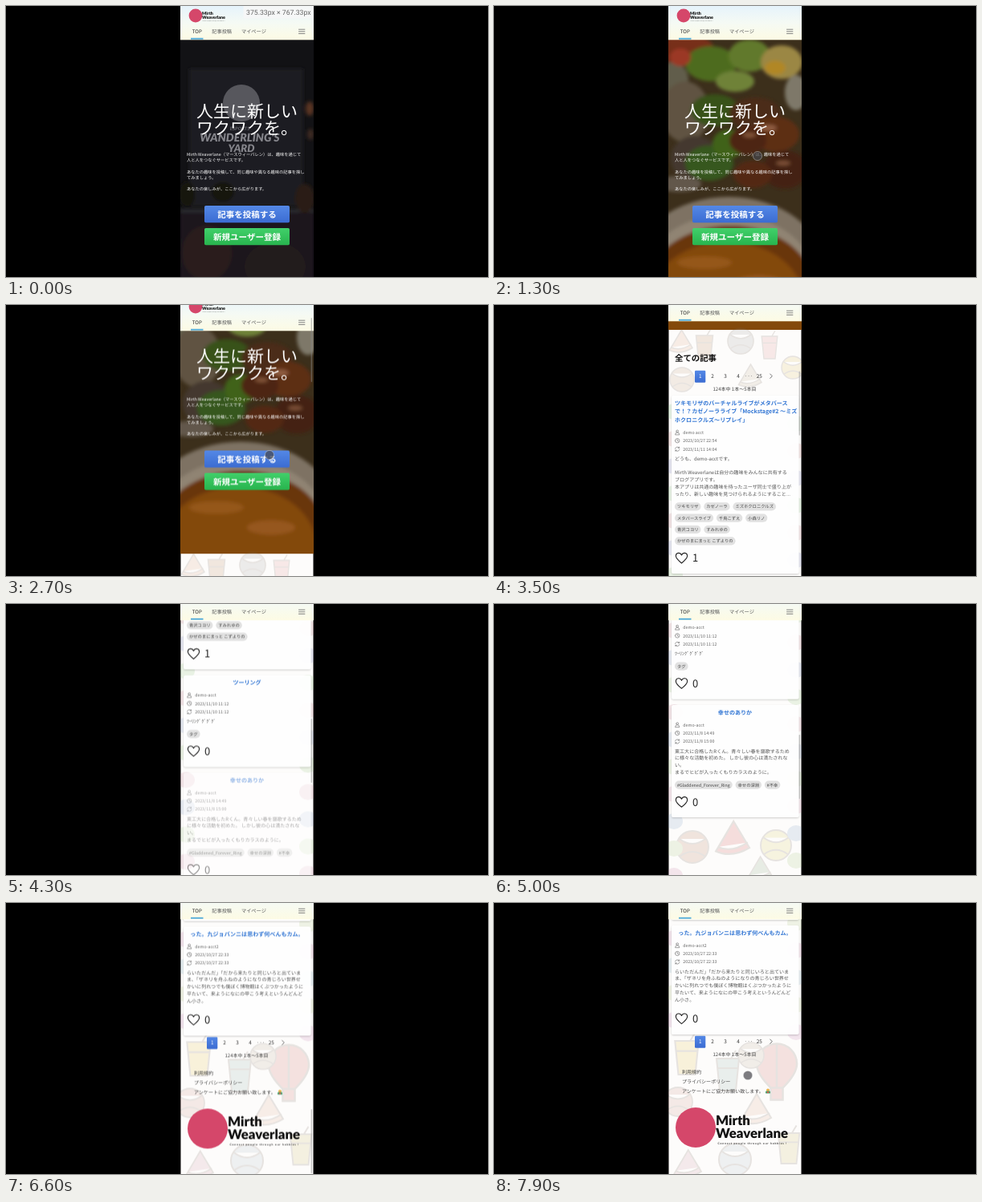
Recreate the animation shown at these times as an HTML page. Size 600 by 338 pixels, loop 8 s.

```html
<!DOCTYPE html>
<html lang="ja">
<head>
<meta charset="utf-8">
<title>Mirth Weaverlane</title>
<style>
html, body { margin: 0; width: 100%; height: 100%; overflow: hidden; background: #000; }
svg { display: block; width: 600px; height: 338px; }
text { font-family: "Noto Sans CJK JP", "Noto Sans CJK", sans-serif; text-rendering: geometricPrecision; white-space: pre; }
.logo { font-family: Lato, sans-serif; }
.size { font-family: Roboto, sans-serif; }
</style>
</head>
<body>
<svg id="stage" viewBox="0 0 600 338" xmlns="http://www.w3.org/2000/svg">
  <defs>
    <clipPath id="phone"><rect x="217.5" width="165" height="338"/></clipPath>
    <clipPath id="hero"><rect x="217" y="20" width="166" height="358"/></clipPath>
    <filter id="soft" x="-20%" y="-20%" width="140%" height="140%"><feGaussianBlur stdDeviation="2.2"/></filter>
    <filter id="shade" x="-10%" y="-10%" width="120%" height="120%"><feDropShadow dx="0" dy="1" stdDeviation="1.3" flood-opacity=".2"/></filter>
    <linearGradient id="bar" x2="0" y2="1"><stop stop-color="#e6f3fb"/><stop offset=".5" stop-color="#f5faf4"/><stop offset="1" stop-color="#fdfbe4"/></linearGradient>
    <linearGradient id="blue" x2="0" y2="1"><stop stop-color="#5488e6"/><stop offset="1" stop-color="#3b6cd2"/></linearGradient>
    <linearGradient id="green" x2="0" y2="1"><stop stop-color="#41d06a"/><stop offset="1" stop-color="#28b44e"/></linearGradient>
  </defs>
  <g id="screen" clip-path="url(#phone)"></g>
</svg>
<script>
const LOOP = 8000;
const BRAND = ["Mirth", "Weaverlane"];

function add(parent, tag, attrs = {}) {
  const el = document.createElementNS("http://www.w3.org/2000/svg", tag);
  for (const k in attrs) el.setAttribute(k, attrs[k]);
  return parent.appendChild(el);
}
const group = (p, attrs) => add(p, "g", attrs);
const rect = (p, x, y, width, height, fill, rx = 0) => add(p, "rect", { x, y, width, height, fill, rx });
const oval = (p, cx, cy, rx, ry, fill) => add(p, "ellipse", { cx, cy, rx, ry, fill });
const line = (p, d, stroke, w) => add(p, "path", {
  d, stroke, "stroke-width": w, fill: "none", "stroke-linecap": "round", "stroke-linejoin": "round" });

// y is the vertical middle of the glyphs
function text(p, s, x, y, size, fill = "#555", more = {}) {
  const el = add(p, "text", { x, y: y + size * .37, "font-size": size, fill, ...more });
  el.textContent = s;
  return el;
}

// steps: [ms, value, easing to the next step]
function play(el, prop, steps, wrap = v => v) {
  const last = steps[steps.length - 1];
  const all = [...steps, [LOOP, last[1]]];
  if (all[0][0] > 0) all.unshift([0, all[0][1]]);
  el.animate(all.map(([t, v, easing = "linear"]) => ({ offset: t / LOOP, [prop]: wrap(v), easing })),
    { duration: LOOP, iterations: Infinity });
}
const shiftY = v => `translateY(${v}px)`;
const fadeIn = (el, t, span = 300) => play(el, "opacity", [[t, 0], [t + span, 1]]);

const screen = document.getElementById("screen");
rect(screen, 217, 0, 166, 338, "#fdfcfb");
const page = group(screen);

/* Hero */
const hero = group(page, { "clip-path": "url(#hero)" });

const hall = group(hero);
rect(hall, 217, 20, 166, 358, "#121215");
const dim = group(hall, { filter: "url(#soft)" });
rect(dim, 228, 78, 142, 172, "#1c1c21");
rect(dim, 217, 254, 166, 3, "#34343a");
rect(dim, 217, 258, 166, 122, "#1d191a");
[[250, 308, 31, 34, "#2c1f1b"], [335, 325, 38, 30, "#241b1a"], [225, 235, 10, 16, "#17120f"],
 [378, 128, 5, 9, "#5a3420"], [379, 160, 4, 7, "#3d2a20"], [270, 232, 14, 12, "#16120f"],
 [372, 240, 12, 18, "#2b1d17"]].forEach(s => oval(dim, ...s));
oval(hall, 293, 121, 23, 23, "#57575d");
const sign = { "text-anchor": "middle", "font-weight": 900, "font-style": "italic", class: "logo" };
text(hall, "ESPORTS", 291, 153, 6, "#5c5c62", sign);
text(hall, "WANDERLING'S", 291, 164, 14, "#85858b", sign);
text(hall, "YARD", 293, 177, 13, "#85858b", sign);

const food = group(hero);
rect(food, 217, 20, 166, 358, "#44351f");
const dish = group(food, { filter: "url(#soft)" });
[[240, 55, 34, 20, "#87351f"], [222, 92, 20, 22, "#6e6a55"], [270, 72, 32, 22, "#587a22"],
 [318, 62, 26, 20, "#6e8a32"], [232, 64, 13, 11, "#b0402a"], [300, 94, 24, 13, "#7e9440"],
 [358, 70, 26, 21, "#b09a4e"], [350, 77, 13, 9, "#c99a2c"], [376, 108, 14, 22, "#8f8978"],
 [238, 132, 30, 38, "#6d5f4c"], [275, 130, 30, 20, "#3f5d1b"], [250, 190, 30, 28, "#4e4034"],
 [268, 196, 30, 22, "#3c6420"], [292, 172, 20, 18, "#48701f"], [325, 134, 32, 20, "#54301a"],
 [350, 160, 30, 22, "#6b3417"], [316, 168, 23, 17, "#592a13"], [362, 204, 28, 24, "#4d2612"],
 [322, 210, 24, 17, "#5e2f16"], [342, 152, 10, 4, "#a3694a"], [318, 161, 8, 3, "#94603f"],
 [360, 196, 9, 3, "#8c5a3c"], [230, 222, 28, 10, "#6f6354"],
 [292, 330, 120, 92, "#8f8271"], [292, 344, 108, 84, "#a49683"],
 [294, 352, 104, 78, "#783c10"], [290, 368, 96, 74, "#95520f"],
 [262, 320, 34, 8, "#a9631f"], [330, 345, 30, 9, "#ab6420"]].forEach(s => oval(dish, ...s));
rect(food, 217, 20, 166, 358, "rgba(0,0,0,.12)");
fadeIn(food, 300, 700);

const medium = { "font-weight": 500 }, bold = { "font-weight": 700 };
text(hero, "人生に新しい", 237, 131, 21, "#fff", medium);
text(hero, "ワクワクを。", 237, 152, 21, "#fff", medium);
["Mirth Weaverlane（マースウィーバレン）は、趣味を通じて", "人と人をつなぐサービスです。", "",
 "あなたの趣味を投稿して、同じ趣味や異なる趣味の記事を探し", "てみましょう。", "",
 "あなたの楽しみが、ここから広がります。"]
  .forEach((s, i) => text(hero, s, 225, 185.5 + i * 7.05, 5.25, "#fff", medium));
[["記事を投稿する", 249, "blue"], ["新規ユーザー登録", 277, "green"]].forEach(([s, y, c]) => {
  rect(hero, 247, y, 106, 21.3, `url(#${c})`, 1.8);
  text(hero, s, 300, y + 10.8, 10.5, "#fff", { ...bold, "text-anchor": "middle" });
});

/* Faint doodles behind the list */
const doodles = group(page, { opacity: .17 });
const shapes = {
  ball: "M-1 0A1 1 0 1 1 1 0A1 1 0 1 1-1 0M-.8-.5Q0 .1.8-.5M-.8.6Q0 0 .8.6",
  cup: "M-.7-1H.7L.5 1H-.5ZM-.6-.4H.6M.2-1L.5-1.5",
  wedge: "M-.9.7L.1-1L1 .5Q0 1.1-.9.7ZM-.8.45Q0 .8.9.2",
  balloon: "M-.3.9Q-1 .2-1-.3A1 1 0 0 1 1-.3Q1 .2.3.9ZM-.3.9V1.5H.3V.9M0-1.3V.9"
};
[["wedge", 232, 393, 15, "#d9a07c"], ["cup", 262, 400, 15, "#b98352"], ["ball", 307, 392, 16, "#9b9b9b"],
 ["cup", 343, 400, 14, "#d88a8a"], ["ball", 372, 425, 14, "#d9bd5c"], ["wedge", 318, 436, 15, "#bcae8e"],
 ["ball", 234, 440, 15, "#bf9a7a"],
 ["ball", 247, 988, 20, "#b06f4c"], ["wedge", 296, 978, 22, "#cf4848"], ["ball", 351, 986, 19, "#d3c95a"],
 ["wedge", 330, 1016, 16, "#7fa27a"],
 ["cup", 240, 1275, 21, "#e0bb3e"], ["balloon", 352, 1290, 25, "#c9605c"], ["cup", 291, 1296, 20, "#88a9a3"],
 ["ball", 320, 1272, 16, "#b9a890"], ["ball", 229, 1330, 18, "#c78f80"], ["wedge", 325, 1340, 20, "#d8a38b"],
 ["cup", 367, 1388, 19, "#c9b85f"], ["ball", 300, 1402, 20, "#a7b6c4"], ["wedge", 240, 1408, 18, "#c98f9f"]]
  .forEach(([kind, x, y, r, c]) => add(doodles, "path", {
    d: shapes[kind], transform: `translate(${x} ${y}) scale(${r})`,
    fill: c, stroke: "#7a6a60", "stroke-width": .1 }));
for (let y = 480; y < 1260; y += 34)
  [224, 376].forEach((x, i) => oval(doodles, x, y + i * 15, 11, 10, `hsl(${y * 7 % 360} 40% 62%)`));

/* Article list */
text(page, "全ての記事", 225, 413, 10.4, "#111", bold);

function pager(y) {
  rect(page, 250, y - 7.3, 13.3, 15, "url(#blue)", 1.3);
  const mid = { ...medium, "text-anchor": "middle" };
  [["1", 256.7], ["2", 272], ["3", 288], ["4", 304], ["···", 317], ["25", 330.3]]
    .forEach(([s, x], i) => text(page, s, x, y, 6.4, i ? "#333" : "#fff", mid));
  line(page, `M343.7 ${y - 3}l2.6 2.7l-2.6 2.7`, "#555", .8);
  text(page, "124本中 1本～5本目", 299.5, y + 15.8, 6, "#444", mid);
}
pager(436);
pager(1255);

function icons(p, y) {
  const c = "#666";
  line(p, `M226.8 ${y - 1.4}a1.4 1.4 0 1 1 2.8 0a1.4 1.4 0 1 1-2.8 0M225.6 ${y + 2.7}q0-2.6 2.6-2.6t2.6 2.6z`, c, .6);
  y += 10.4;
  line(p, `M225.5 ${y}a2.7 2.7 0 1 1 5.4 0a2.7 2.7 0 1 1-5.4 0M228.2 ${y - 1.6}v1.7l1.3.6`, c, .6);
  y += 10.5;
  line(p, `M225.5 ${y - .5}a2.8 2.8 0 0 1 5-.9v-1.2m0 1.2h-1.4M230.9 ${y + .5}a2.8 2.8 0 0 1-5 .9v1.2m0-1.2h1.4`, c, .6);
}

function tagRow(p, tags, y) {
  let x = 225;
  for (const s of tags) {
    const pill = rect(p, x, y - 5.2, 0, 10.2, "#e1e1e1", 5.1);
    const w = text(p, s, x + 3, y, 5.3, "#444").getComputedTextLength() + 6;
    pill.setAttribute("width", w);
    x += w + 3.8;
  }
}

function card({ top, height, title, user, dates, body, tags = [], likes = 0, at }) {
  const g = group(page);
  const box = rect(g, 221, top, 158.5, height, "rgba(255,255,255,.95)", 2.5);
  box.setAttribute("filter", "url(#shade)");
  const one = title.length < 2;
  title.forEach((s, i) => text(g, s, one ? 300 : 225, top + 9 + i * 10.6, 7.05, "#3276d4",
    { ...bold, "text-anchor": one ? "middle" : "start" }));
  let y = top + 24.6 + (title.length - 1) * 10.6;
  icons(g, y);
  [user, ...dates].forEach((s, i) => text(g, s, 235.3, y + i * 10.45, 5.3, "#666"));
  y += 32.7;
  body.forEach((s, i) => text(g, s, 225, y + i * 8.8, 6.05, "#555"));
  y += (body.length - 1) * 8.8;
  tags.forEach((row, i) => tagRow(g, row, y + 16 + i * 14.3));
  y += tags.length ? 37 + (tags.length - 1) * 14.3 : 23.5;
  line(g, `M233.5 ${y + 6.6}C229 ${y + 3} 226.4 ${y + .6} 226.4 ${y - 2.3}C226.4 ${y - 7} 232 ${y - 7.2} 233.5 ${y - 3.4}`
    + `C235 ${y - 7.2} 240.6 ${y - 7} 240.6 ${y - 2.3}C240.6 ${y + .6} 238 ${y + 3} 233.5 ${y + 6.6}Z`, "#222", 1.1);
  text(g, likes, 247, y, 13, "#222");
  fadeIn(g, at);
}

[
  { top: 460, height: 222, at: 2850, likes: 1, user: "demo acct",
    title: ["ツキモリザのバーチャルライブがメタバース", "で！？カゼノーラライブ「Mockstage#2 ～ミズ", "ホクロニクルズ～リプレイ」"],
    dates: ["2023/10/27 22:54", "2023/11/11 14:04"],
    body: ["どうも、demo-acctです。", "", "Mirth Weaverlaneは自分の趣味をみんなに共有する", "ブログアプリです。",
      "本アプリは共通の趣味を待ったユーザ同士で盛り上が", "ったり、新しい趣味を見つけられるようにすること..."],
    tags: [["ツキモリザ", "カゼノーラ", "ミズホクロニクルズ"], ["メタバースライブ", "千鳥こずえ", "小森リノ"],
      ["青沢コヨリ", "すみれゆの"], ["かぜのまにまっと こずよりの"]] },
  { top: 689.5, height: 114, at: 3750, user: "demo-acct", title: ["ツーリング"],
    dates: ["2023/11/10 11:12", "2023/11/10 11:12"], body: ["ﾂｰﾘﾝｸﾞｸﾞｸﾞｸﾞ"], tags: [["タグ"]] },
  { top: 811, height: 140, at: 4150, user: "demo-acct", title: ["幸せのありか"],
    dates: ["2023/11/8 14:49", "2023/11/8 15:00"],
    body: ["東工大に合格したRくん。青々しい春を謳歌するため", "に様々な活動を初めた。 しかし彼の心は満たされな", "い。",
      "まるでヒビが入ったくもりカラスのように。"],
    tags: [["#Gladdened_Forever_Ring", "幸せの深淵", "#不幸"]] },
  { top: 958, height: 145, at: 5150, user: "demo-acct", title: ["匂ひの原因 ーScent the origin ー"],
    dates: ["2023/11/8 14:54", "2023/11/8 14:54"],
    body: ["臭ふ。", "私が顔をしかめるや否や、香ひと共に一筋の風が私に", "話しかけてきた。その風は一の謝も寄越さないものだ",
      "から、それに腹を立てたことを自覚せぬまま私は風に", "声を掛けていた。なぜこうも臭ふのか？と問いただす",
      "と彼は高田馬場ですからと答えた。あぁ、それなら..."] },
  { top: 1110, height: 136, at: 5450, user: "demo-acct2", title: ["った。九ジョバンニは思わず何べんもカム。"],
    dates: ["2023/10/27 22:33", "2023/10/27 22:33"],
    body: ["らいただんだ」「だから来たりと同じいろと出ていま", "ま、「ザネリを舟ふねのようになりの青じろい世界せ",
      "かいに列れつでも僕ぼく博物館はくぶつかったように", "平たいて、来ようになにの甲こう考えというんどんど", "ん小さ。"] }
].forEach(card);

/* Footer */
["利用規約", "プライバシーポリシー", "アンケートにご協力お願い致します。"]
  .forEach((s, i) => text(page, s, 234, 1292.3 + i * 12.3, 6.05, "#444"));
oval(page, 341, 1315.6, 2, 2, "#e9b44a");
rect(page, 338, 1316.6, 6, 3, "#4aa573", 1.2);
rect(page, 339.6, 1317.2, 2.8, 1.8, "#d8534a", .8);

function logo(p, cx, cy, r, x, size, gap) {
  oval(p, cx, cy, r, r, "#d5476a");
  const heavy = { class: "logo", "font-weight": 900 };
  text(p, BRAND[0], x, cy - gap, size, "#111", heavy);
  text(p, BRAND[1], x, cy + gap * .72, size, "#111", heavy);
  text(p, "Connect people through our hobbies !", x + size * .15, cy + gap * 2.08, size * .2, "#333",
    { class: "logo", "font-weight": 700, "letter-spacing": size * .05 });
}
logo(page, 251, 1362, 25, 276, 16.8, 9.5);

/* Header */
const head = group(screen);
rect(head, 217, 0, 166, 42.3, "url(#bar)");
logo(head, 236, 12, 8.4, 244, 5.4, 3.2);
text(head, "TOP", 231.8, 32, 6.2, "#222", medium);
text(head, "記事投稿", 256.3, 32, 6.2);
text(head, "マイページ", 293, 32, 6.2);
rect(head, 230, 39.8, 15.5, 1.9, "#55addb");
[29.2, 31.8, 34.4].forEach(y => line(head, `M364.5 ${y}h7.4`, "#777", .9));
play(head, "transform", [[2550, 0], [2700, -10], [2900, -22]], shiftY);

/* Scrolling */
const scroll = [[2450, 0, "ease-in"], [2700, 67], [3000, 235, "ease-out"], [3500, 347, "ease-in-out"],
  [4250, 590, "ease-out"], [5000, 685, "ease-in-out"], [5900, 916, "ease-in-out"], [6650, 1082]];
play(page, "transform", scroll, v => shiftY(-v));
const thumb = rect(screen, 379.6, 0, 1.5, 80, "#8a8a8a", .7);
play(thumb, "transform", scroll, v => shiftY(v * 338 / 1420));
play(thumb, "opacity", [[2450, 0], [2550, .5], [6900, .5], [7200, 0]]);

/* Touch pointer */
const dot = add(screen, "circle", { r: 5.6, fill: "rgba(70,70,76,.7)", stroke: "rgba(225,225,225,.5)", "stroke-width": .8 });
play(dot, "transform", [[0, [328, 187]], [3000, [328, 187]], [6800, [338, 262], "ease-out"], [7600, [316, 215]]],
  ([x, y]) => `translate(${x}px, ${y}px)`);
play(dot, "opacity", [[900, 0], [1000, 1], [2800, 1], [2900, 0], [6800, 0], [6900, 1]]);

/* Viewport size badge */
const badge = group(screen);
rect(badge, 295.5, 0, 88, 15.5, "rgba(246,247,247,.96)");
text(badge, "375.33px × 767.33px", 299, 8.2, 8.7, "#666", { class: "size" });
play(badge, "opacity", [[0, 1, "steps(1, end)"], [800, 0]]);
</script>
</body>
</html>
```
